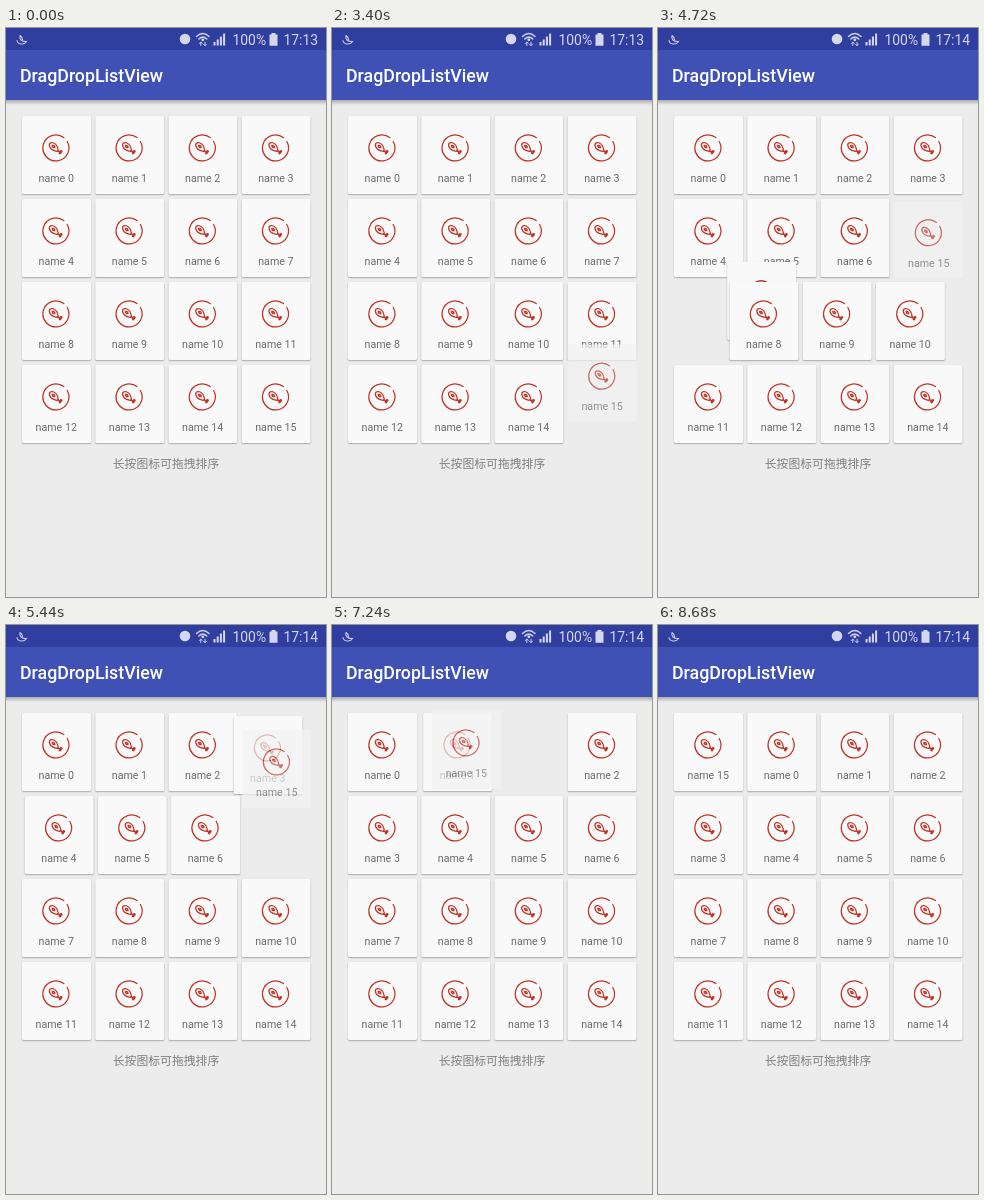
Animation of 320x569 px, one loop 8.84 s. Source, as an HTML page:

```html
<!DOCTYPE html>
<html lang="zh">
<head>
<meta charset="utf-8">
<title>DragDropListView</title>
<style>
  html, body { margin: 0; width: 100%; height: 100%; overflow: hidden; background: #ececec; }
  body { position: relative; font-family: Roboto, sans-serif; --loop: 8840ms; }
  .header, .grid { position: absolute; left: 0; top: 0; width: 320px; height: 569px; }
  .header { height: 80px; display: block; }
  .grid { clip-path: inset(0 0 0 14px); }

  .card {
    position: absolute; left: 0; top: 0; width: 68.5px; height: 78px;
    border-radius: 1.5px; background: #f9f9f9;
    box-shadow: 0 1px 1.5px rgba(0, 0, 0, .27), 0 0 1px rgba(0, 0, 0, .12);
    transform: translate(var(--from));
    animation: var(--loop) linear infinite;
  }
  .card svg { position: absolute; left: 19.2px; top: 17px; width: 30px; height: 30px; }
  .card span {
    position: absolute; left: 0; right: 0; top: 56px; line-height: 14px;
    text-align: center; font-size: 10.67px; color: #6b6b6b; white-space: nowrap;
  }
  .hint {
    position: absolute; left: 0; width: 320px; top: 426px; line-height: 18px; text-align: center;
    font-family: "Noto Sans CJK SC", "Noto Sans CJK", sans-serif; font-size: 11.85px; color: #808080;
  }

  /* Each group of cards moves on by one slot when the dragged card passes it. */
  .row3 { animation-name: row3; }
  .row2 { animation-name: row2; }
  .row1 { animation-name: row1; }
  .col2 { animation-name: col2; }
  .col1 { animation-name: col1; }
  .col0 { animation-name: col0; }
  .row3, .row2, .row1, .col2, .col1, .col0 { animation-timing-function: cubic-bezier(.37, 0, .63, 1); }
  @keyframes row3 { 0%, 45.02% { transform: var(--start); } 48.42%, 100% { transform: var(--end); } }
  @keyframes row2 { 0%, 51.13% { transform: var(--start); } 54.52%, 100% { transform: var(--end); } }
  @keyframes row1 { 0%, 61.13% { transform: var(--start); } 64.52%, 100% { transform: var(--end); } }
  @keyframes col2 { 0%, 74.77% { transform: var(--start); } 78.17%, 100% { transform: var(--end); } }
  @keyframes col1 { 0%, 81.56% { transform: var(--start); } 84.95%, 100% { transform: var(--end); } }
  @keyframes col0 { 0%, 88.6% { transform: var(--start); } 91.99%, 100% { transform: var(--end); } }

  .resting { animation-name: resting; animation-timing-function: step-end; }
  @keyframes resting {
    0% { transform: var(--start); visibility: visible; }
    24.43% { transform: var(--end); visibility: hidden; }
    96.83%, 100% { transform: var(--end); visibility: visible; }
  }

  .ghost { box-shadow: none; opacity: .7; background: #f2f2f2; animation-name: drag, lifted; }
  @keyframes lifted {
    0%, 24.42% { visibility: hidden; }
    24.43%, 96.82% { visibility: visible; }
    96.83%, 100% { visibility: hidden; }
  }
  @keyframes drag {
    0%, 33.94% { transform: translate(235.6px, 337px); }
    40.72% { transform: translate(236px, 306px); }
    45.02% { transform: translate(236.5px, 254px); }
    46.15% { transform: translate(236.5px, 226px); }
    48.64% { transform: translate(236.5px, 206px); }
    51.58% { transform: translate(236.5px, 188px); }
    61.54% { transform: translate(236.5px, 105px); }
    64.48% { transform: translate(236.5px, 91px); }
    66.74% { transform: translate(235px, 88px); }
    73.3% { transform: translate(191.7px, 88px); }
    90.5% { transform: translate(8.7px, 84px); }
    95.93%, 100% { transform: translate(15px, 88px); }
  }

  .before, .after { animation: var(--loop) step-end infinite; }
  .before { animation-name: before; }
  .after { animation-name: after; }
  @keyframes before { 0% { opacity: 1; } 53.39%, 100% { opacity: 0; } }
  @keyframes after { 0% { opacity: 0; } 53.39%, 100% { opacity: 1; } }
</style>
</head>
<body>
<svg class="header" viewBox="0 0 320 80">
  <defs>
    <linearGradient id="shade" x2="0" y2="1">
      <stop stop-color="#000" stop-opacity=".28"/>
      <stop offset="1" stop-color="#000" stop-opacity="0"/>
    </linearGradient>
    <symbol id="drumstick" viewBox="-15 -15 30 30">
      <g fill="none" stroke="#bf3527" stroke-width="1.25" stroke-linecap="round" stroke-linejoin="round">
        <path d="M11.2 -6.5A13 13 0 1 1 7.8 -10.4"/>
        <path d="M-6.2 -4.6C-4.5 -6.4 -1 -5.2 .7 -2.5C1.7 -.8 1.8 1 2.3 2.2L1.4 3.3C-1 3 -4 2.4 -5.5 .2C-6.5 -1.3 -7 -3.3 -6.2 -4.6Z"/>
        <path d="M-3.8 -2.6C-2.3 -3 -1 -1.8 -1.2 -.3M-3.8 -2.6C-3.8 -1.2 -2.6 -.3 -1.2 -.3"/>
        <path d="M2 2.8L4.2 4.2" stroke-width="1.6"/>
      </g>
      <circle cx="5.1" cy="3.5" r="1.4" fill="#bf3527"/>
      <circle cx="4" cy="5" r="1.4" fill="#bf3527"/>
    </symbol>
  </defs>
  <rect y="72" width="320" height="5" fill="url(#shade)"/>
  <rect width="320" height="72" fill="#3f51b5"/>
  <rect width="320" height="22" fill="#303f9f"/>

  <g fill="none" stroke="#c9cdea" stroke-width="1.1" stroke-linecap="round">
    <path d="M14 7.5C13 11 15.500 14 20.500 13.500C18 17.500 11.500 16.500 11 12.500M14 7.500C15.500 8.500 16.500 10 16.500 11.500"/>
    <path d="M190.500 8.500Q196.800 2.500 203 8.500M192.800 11Q196.800 7.200 200.800 11" stroke-width="1.5"/>
    <path d="M194.800 17.500V14.200M193.400 15.500L194.800 14L196.200 15.500M199 14.200V17.500M197.600 16.200L199 17.700L200.400 16.200" stroke-width="1"/>
  </g>
  <g fill="#d3d7ef">
    <circle cx="179" cy="11" r="5.300"/>
    <circle cx="196.800" cy="11.800" r="1.400"/>
    <path d="M207.500 14h2v3.500h-2zM210.700 11.500h2v6h-2zM213.900 8.500h2v9h-2zM217.100 5.500h2v12h-2z"/>
    <path d="M265.500 5h4v1.500h2v11.300h-8v-11.300h2z"/>
    <g font-size="13.900">
      <text x="226.500" y="17">100%</text>
      <text class="before" x="277.500" y="17">17:13</text>
      <text class="after" x="277.500" y="17">17:14</text>
    </g>
  </g>
  <text x="14" y="54" font-size="17.780" font-weight="500" fill="#fff">DragDropListView</text>
</svg>

<div class="grid"></div>
<div class="hint">长按图标可拖拽排序</div>

<script>
  const grid = document.querySelector('.grid');
  const slot = i => `translate(${16 + (i % 4) * 73.2}px, ${88 + Math.floor(i / 4) * 83}px)`;

  function addCard(id, kind, end) {
    const card = document.createElement('div');
    card.className = 'card ' + kind;
    card.style.setProperty('--start', slot(id));
    card.style.setProperty('--end', slot(end));
    card.innerHTML = `<svg><use href="#drumstick"/></svg><span>name ${id}</span>`;
    grid.append(card);
  }

  for (let id = 0; id < 15; id++) {
    addCard(id, id < 3 ? 'col' + id : 'row' + Math.floor((id + 1) / 4), id + 1);
  }
  addCard(15, 'resting', 0);
  addCard(15, 'ghost', 0);
</script>
</body>
</html>
```
